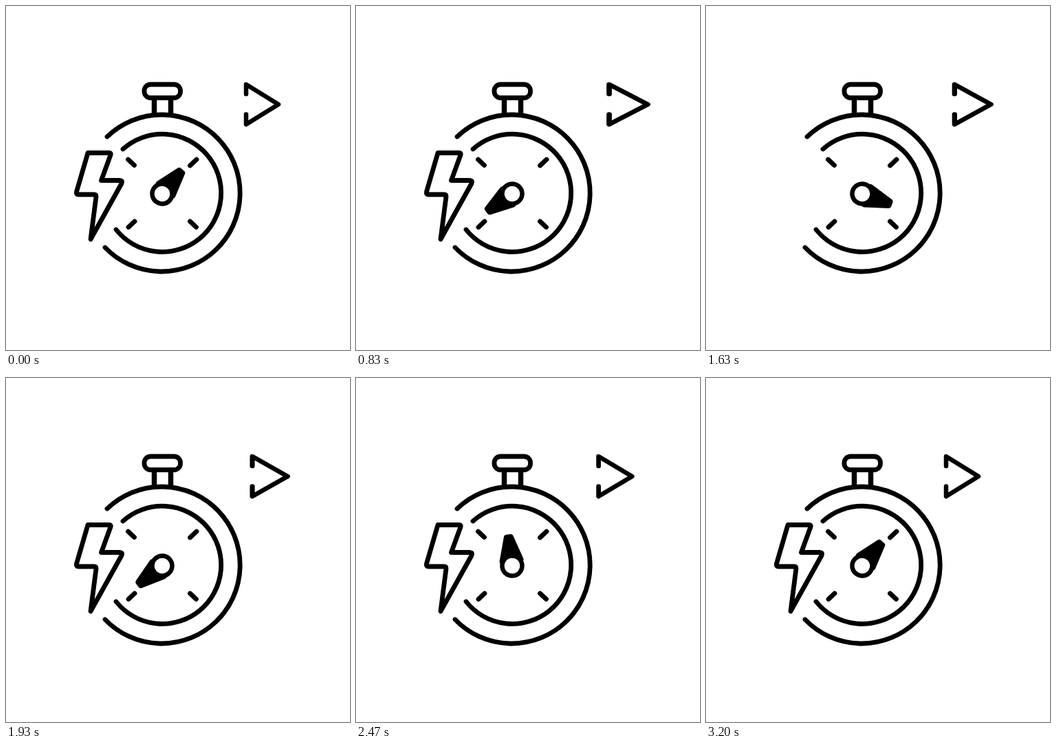
Animation of 500 by 500 pixels, one loop 3.23 s. Source, as an HTML page:

```html
<!DOCTYPE html>
<html lang="en">
<head>
<meta charset="utf-8">
<title>Stopwatch</title>
<style>
  html, body { margin: 0; width: 100%; height: 100%; overflow: hidden; background: #fff; }
  svg { display: block; width: 100vw; height: 100vh; }
</style>
</head>
<body>
<svg viewBox="0 0 500 500" fill="none" stroke="#000" stroke-width="6.8" stroke-linecap="round" stroke-linejoin="round">
  <path d="M215.500 134V157M239.500 134V157" stroke-width="7.5"/>
  <rect id="crown" x="201" y="114" width="52.5" height="19.5" rx="9" fill="#fff"/>
  <path d="M147 190A114 114 0 1 1 144 351"/>
  <path d="M170 208A85.6 85.6 0 1 1 160 325"/>
  <path d="M177.5 223l9 8.5M277 223l-9.5 9M178 321.5l9-8.5M267.5 313l9 8.5"/>
  <g id="needle">
    <path d="M-13.5-8L-3-42H3L13.5-8Z" fill="#000" stroke-width="8"/>
    <circle r="14.5" fill="#fff" stroke-width="6.500"/>
  </g>
  <path id="bolt" d="M119 213.500H150Q153 213.500 152 216.500L138.500 253.500H166Q170 254 168 258L123 339L131 277Q131 274 128 274H105Q101.500 274 102.500 270Z"/>
  <path id="arrow" d="M349 128V114L396 143L349 172V157.500" stroke-width="6.500"/>
</svg>
<script>
const LOOP = 3230;
const [crown, needle, bolt, arrow] =
  ['crown', 'needle', 'bolt', 'arrow'].map(id => document.getElementById(id));

const clamp = u => Math.min(1, Math.max(0, u));
const smooth = u => u * u * (3 - 2 * u);

// Eased progress of t between a and b
const ease = (t, a, b) => smooth(clamp((t - a) / (b - a)));

// Progress along cubic-bezier(x1, 0, x2, 1)
const bezier = (u, x1, x2) => {
  let lo = 0, hi = 1;
  for (let i = 0; i < 24; i++) {
    const s = (lo + hi) / 2, r = 1 - s;
    if (3 * r * r * s * x1 + 3 * r * s * s * x2 + s * s * s < u) lo = s;
    else hi = s;
  }
  return smooth(lo);
};

function draw(t) {
  const press = 6 * (ease(t, 60, 260) - ease(t, 370, 500));
  crown.setAttribute('transform', `translate(0 ${press})`);

  const angle = 40 + 1080 * bezier(clamp((t - 225) / 2990), .333, .24);
  needle.setAttribute('transform', `translate(227 273) rotate(${angle})`);

  const stretch = 1 + .2 * (ease(t, 370, 500) - ease(t, 500, 3200));
  arrow.setAttribute('transform', `translate(250 0) scale(${stretch} 1) translate(-250 0)`);

  bolt.style.visibility = Math.floor(t / 300) % 2 ? 'hidden' : 'visible';
}

let start;
function frame(now) {
  start ??= now;
  draw((now - start) % LOOP);
  requestAnimationFrame(frame);
}
draw(0);
requestAnimationFrame(frame);
</script>
</body>
</html>
```
